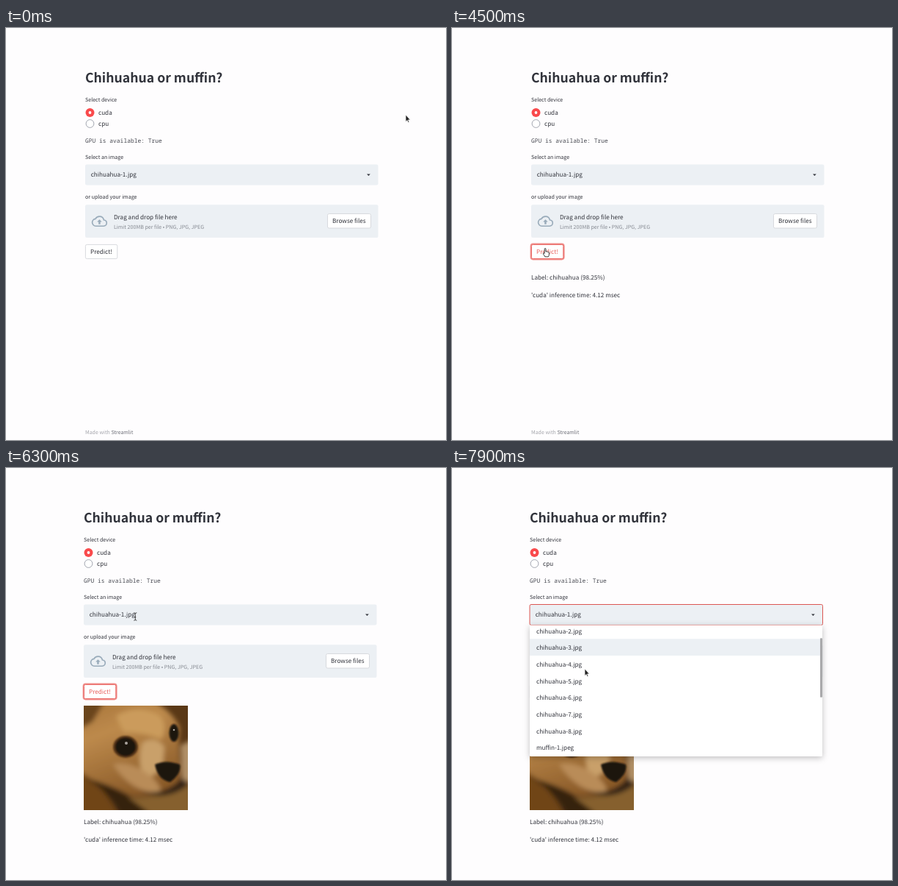
These frames come from a looping animation (600 by 560 pixels, 8 s). An HTML page:

```html
<!DOCTYPE html>
<html lang="en">
<head>
<meta charset="utf-8">
<title>Chihuahua or muffin?</title>
<style>
html, body { margin: 0; width: 100%; height: 100%; overflow: hidden; background: #fefdfe; }
#stage { display: block; }
text { font: 8.17px "Noto Sans CJK JP", "Noto Sans CJK SC", "Noto Sans CJK KR", "Noto Sans", sans-serif;
  fill: #31333b; white-space: pre; text-rendering: geometricPrecision; }
text.title { font-size: 17.65px; font-weight: 700; }
text.small { font-size: 7.1px; }
text.mono { font: 7.95px "Noto Sans Mono", monospace; fill: #484a52; }
text.dim { fill: #868a92; }
text.foot { font-size: 7px; fill: #a5a6ac; }
.field { fill: #ecf0f4; }
.button { fill: #fff; stroke: #d8dade; }
.hot rect.button { stroke: #e8605c; }
.hot text { fill: #e8605c; }
.shadow { filter: drop-shadow(0 2px 4px rgba(0, 0, 0, .25)); }
</style>
</head>
<body>
<svg id="stage" width="600" height="560" viewBox="0 0 600 560">
  <defs>
    <clipPath id="listClip"><rect x="108" y="217" width="399" height="171"/></clipPath>
    <filter id="soft" x="-20%" y="-20%" width="140%" height="140%"><feGaussianBlur stdDeviation="3"/></filter>
    <filter id="sharp" x="-20%" y="-20%" width="140%" height="140%"><feGaussianBlur stdDeviation="1.3"/></filter>
    <linearGradient id="fur" x1=".1" y1="0" x2=".5" y2="1">
      <stop offset="0" stop-color="#a8753a"/><stop offset=".35" stop-color="#bd8a4c"/><stop offset="1" stop-color="#8a5a28"/>
    </linearGradient>
  </defs>

  <g id="page">
    <text class="title" x="108" y="74">Chihuahua or muffin?</text>
    <text class="small" x="108" y="100">Select device</text>
    <circle cx="114.5" cy="115" r="6" fill="#f94a4c"/>
    <circle cx="114.5" cy="115" r="1.9" fill="#fff"/>
    <circle cx="114.5" cy="130" r="5.4" fill="#fff" stroke="#a3a7b1"/>
    <text x="126" y="118">cuda</text>
    <text x="126" y="133">cpu</text>
    <text class="mono" x="108" y="155.6">GPU is available: True</text>

    <text class="small" x="108" y="177.5">Select an image</text>
    <rect class="field" id="select" x="108" y="185.5" width="399.5" height="28" rx="2"/>
    <text x="115.7" y="202.3">chihuahua-1.jpg</text>
    <path d="M492 198.4h4.8l-2.4 2.6z" fill="#31333b"/>
    <path id="caret" d="M178.8 195v11" stroke="#31333b" stroke-width=".8"/>

    <text class="small" x="108" y="232">or upload your image</text>
    <rect class="field" x="108" y="240.3" width="399.5" height="44.7" rx="2"/>
    <g transform="translate(117.6 252.8) scale(.82)" fill="none" stroke="#99abba" stroke-width="2">
      <path d="M19.35 10.04C18.67 6.59 15.64 4 12 4 9.11 4 6.6 5.64 5.35 8.04 2.34 8.36 0 10.91 0 14c0 3.31 2.69 6 6 6h13c2.76 0 5-2.24 5-5 0-2.64-2.05-4.78-4.65-4.96z"/>
      <path d="M8 13h2.5v4h3v-4H16l-4-4z" fill="#99abba" stroke="none"/>
    </g>
    <text x="147" y="259.8">Drag and drop file here</text>
    <text class="small dim" x="147" y="273">Limit 200MB per file • PNG, JPG, JPEG</text>
    <rect class="button" x="438.5" y="252.5" width="59" height="19.5" rx="2"/>
    <text x="445" y="265.2">Browse files</text>

    <g id="predict">
      <rect id="ring" x="107.4" y="293.4" width="45.4" height="21.2" rx="3" fill="none" stroke="#f08f8c" stroke-width="1.6"/>
      <rect class="button" x="108.4" y="294.4" width="43.4" height="19.2" rx="2"/>
      <text x="115" y="307.3">Predict!</text>
    </g>

    <svg id="photo" x="108" y="323" width="142" height="142">
      <rect width="142" height="142" fill="#5a3816"/>
      <g filter="url(#soft)">
        <path d="M132 54L152 44V108L134 100z" fill="#b08f66"/>
        <path d="M-8 12L36 -8H92Q122 8 131 30Q128 58 132 84Q134 108 112 120Q84 126 62 122Q24 118 -8 92z" fill="url(#fur)"/>
        <path d="M44 14Q74 -4 104 14Q116 28 106 46Q82 36 54 36z" fill="#cb9b5c"/>
        <path d="M80 50Q98 40 110 56L108 78Q98 100 82 96Q72 76 80 50z" fill="#c9a06a"/>
        <path d="M40 80Q64 74 92 96Q108 112 104 118Q66 120 40 80z" fill="#b98c58"/>
        <path d="M-8 -8H30L12 22L-8 34z" fill="#6b451c"/>
        <path d="M-8 88Q24 104 46 148H-8z" fill="#6f4519"/>
        <path d="M2 98Q38 108 62 122L96 148H50Q34 116 2 98z" fill="#36200f"/>
        <path d="M60 124Q98 130 150 104V148H92z" fill="#86602f"/>
        <path d="M74 116Q110 124 134 98L142 108Q112 132 74 116z" fill="#302018"/>
      </g>
      <g filter="url(#sharp)" fill="#1d1410">
        <ellipse cx="57" cy="56" rx="17" ry="15" fill="#553416"/>
        <ellipse cx="57" cy="56" rx="14" ry="12.5"/>
        <ellipse cx="123" cy="37" rx="6.5" ry="12"/>
        <path d="M97 80Q112 73 131 80Q134 92 118 104Q101 101 97 80z"/>
      </g>
      <circle cx="58" cy="51" r="2" fill="#a9a39d"/>
      <circle cx="123" cy="33" r="1.3" fill="#a9a39d"/>
    </svg>
    <g id="result">
      <text x="108" y="342.3">Label: chihuahua (98.25%)</text>
      <text x="108" y="366.3">'cuda' inference time: 4.12 msec</text>
    </g>
    <g id="footer">
      <text class="foot" x="108" y="552">Made with <tspan fill="#6d6f77" font-weight="500">Streamlit</tspan></text>
    </g>

    <g id="menu">
      <rect class="shadow" x="108" y="213.5" width="399" height="178.5" rx="1.5" fill="#fff"/>
      <g clip-path="url(#listClip)">
        <g id="list"><rect class="field" id="mark" x="108" width="396" height="22.7"/></g>
      </g>
      <rect id="thumb" x="504" width="3" height="80.5" rx="1" fill="#a9a9ab"/>
    </g>
  </g>

  <g id="cursor">
    <path id="arrow" d="M0 0V9.4L2.1 7.5L3.5 10.6L4.9 10L3.5 6.9H6.3z" fill="#222" stroke="#fff" stroke-width=".7"/>
    <path id="beam" d="M-2 -5.2Q0 -5.2 0 -4V4Q0 5.2 -2 5.2M2 -5.2Q0 -5.2 0 -4M0 4Q0 5.2 2 5.2M-1 .8H1" fill="none" stroke="#333" stroke-width=".9"/>
    <path id="hand" d="M-1.8 1V-5Q-1.8 -6 -.9 -6T0 -5V-1.6Q1 -2.2 1.7 -1.3Q2.7 -1.8 3.2 -.8Q4.4 -1 4.4 .3V2.6Q4.2 4 3.4 5.4H-1.2Q-2 3.6 -3.6 1.8Q-4 .4 -2.8 .3z" fill="#fff" stroke="#222" stroke-width=".9"/>
  </g>
</svg>

<script>
const LOOP = 8000, STEP = 100, ROW = 22.7, LIST_TOP = 217, LIST_H = 171, ROWS = 16;
const HOVER = 2300, CLICK = 3100, LABEL = 4500, PHOTO = 4600, OPEN = 6700, ENTER = 7300;

// time, x, y, pointer shape from that time on
const path = [
  [0, 545, 118, "arrow"], [1100, 545, 118, "arrow"], [1300, 470, 152, "arrow"],
  [1500, 345, 203, "arrow"], [1700, 238, 241, "arrow"], [1800, 207, 254, "beam"],
  [1900, 186, 263, "arrow"], [2100, 160, 283, "arrow"], [2300, 139, 299, "hand"],
  [2500, 128, 305.5, "hand"], [5400, 128, 305.5, "hand"], [5600, 140, 278, "arrow"],
  [5800, 160, 234, "arrow"], [6000, 172, 208, "beam"], [6200, 176.3, 202, "beam"],
  [7200, 176.3, 202, "beam"], [7300, 178, 222, "arrow"], [7600, 181, 273, "arrow"],
  [LOOP, 181, 273, "arrow"]
];

const $ = id => document.getElementById(id);
const show = (id, on) => $(id).setAttribute("display", on ? "inline" : "none");
const move = (id, x, y) => $(id).setAttribute("transform", `translate(${x} ${y})`);
const ramp = (t, a, b) => Math.min(1, Math.max(0, (t - a) / (b - a)));

for (let i = 0; i < ROWS; i++) {
  const row = document.createElementNS("http://www.w3.org/2000/svg", "text");
  row.setAttribute("x", 117);
  row.setAttribute("y", LIST_TOP + ROW * i + 15);
  row.textContent = i < 8 ? `chihuahua-${i + 1}.jpg` : `muffin-${i - 7}.jpeg`;
  $("list").append(row);
}

function pointer(t) {
  const i = path.findIndex(p => p[0] > t) - 1;
  const [t0, x0, y0, shape] = path[i], [t1, x1, y1] = path[i + 1];
  const k = ramp(t, t0, t1);
  return { x: x0 + (x1 - x0) * k, y: y0 + (y1 - y0) * k, shape };
}

function draw(t) {
  const { x, y, shape } = pointer(t);
  move("cursor", x, y);
  for (const s of ["arrow", "beam", "hand"]) show(s, s === shape);

  const loaded = t >= PHOTO, open = t >= OPEN;
  move("page", loaded ? -2 : 0, 0);
  $("predict").setAttribute("class", t >= HOVER && !open ? "hot" : "");
  show("ring", t >= CLICK && !open);
  show("result", t >= LABEL);
  move("result", 0, loaded ? 141.7 : 0);
  show("photo", loaded);
  show("footer", !loaded);

  $("select").setAttribute("stroke", open ? "#dc5652" : "none");
  show("caret", open && t < 7200);
  show("menu", open);
  const scroll = 30.1 * ramp(t, 7600, 7900);
  const row = t < ENTER ? 0 : Math.max(0, Math.floor((y - LIST_TOP) / ROW));
  move("list", 0, -scroll);
  $("mark").setAttribute("y", LIST_TOP + ROW * row);
  show("thumb", t >= ENTER);
  $("thumb").setAttribute("y", LIST_TOP + scroll * LIST_H / (ROW * ROWS));
}

const start = performance.now();
function tick() {
  const t = (performance.now() - start) % LOOP;
  draw(Math.floor(t / STEP) * STEP);
  requestAnimationFrame(tick);
}
tick();
</script>
</body>
</html>
```
